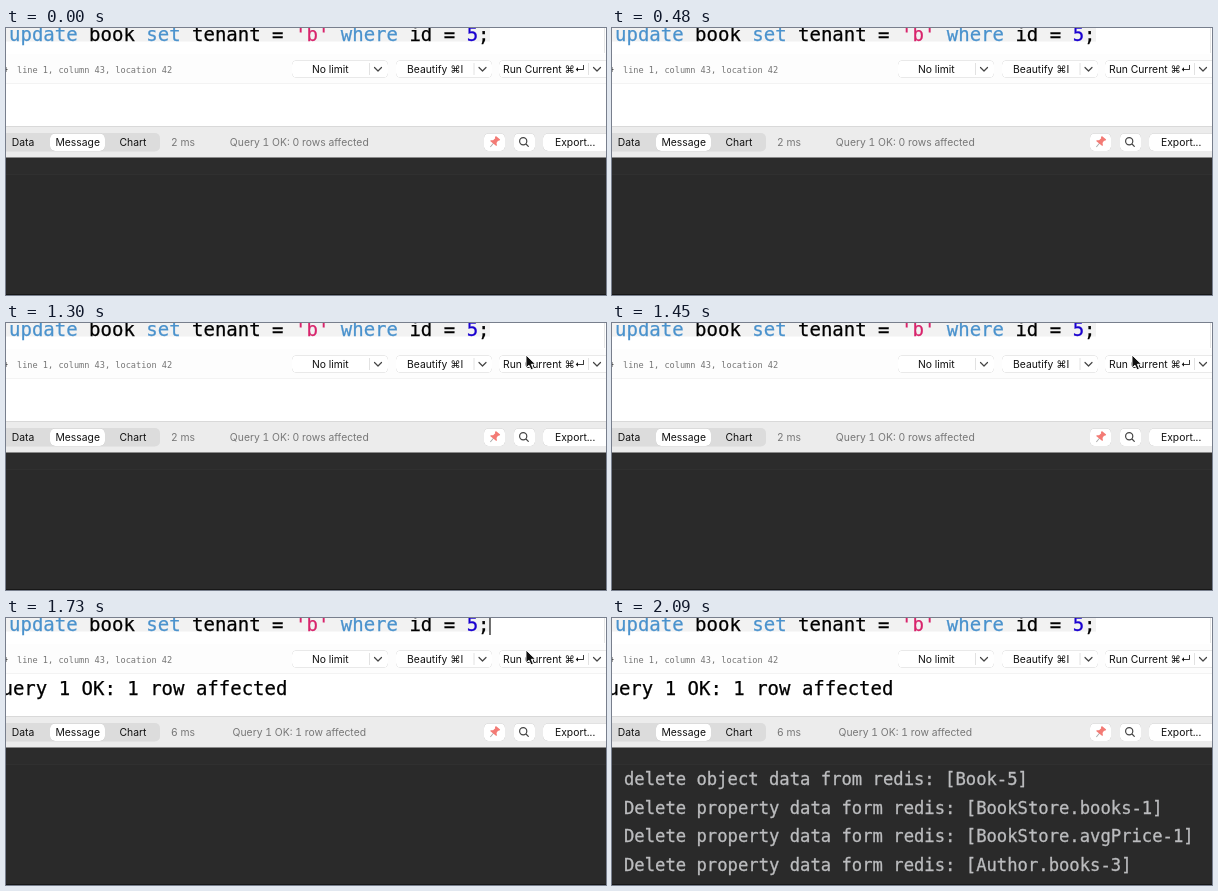
These frames come from a looping animation (600x267 px, 5.33 s). An HTML page:

```html
<!DOCTYPE html>
<html lang="en">
<head>
<meta charset="utf-8">
<title>Query run</title>
<style>
  html, body { margin: 0; width: 100%; height: 100%; overflow: hidden; background: #fff; }
  svg { display: block; width: 100vw; height: 100vh; }
  text { font: 10.35px Inter, "DejaVu Sans", sans-serif; font-variant-numeric: tabular-nums; fill: #111; }
  .code { font: 19px "DejaVu Sans Mono", monospace; fill: #000; stroke: #000; stroke-width: .25; }
  .status { font: 8.6px "DejaVu Sans Mono", monospace; fill: #757575; }
  .log { font: 17.22px "DejaVu Sans Mono", monospace; fill: #bcbdbf; stroke: #bcbdbf; stroke-width: .3; }
  .muted { fill: #777; }
  .mid { text-anchor: middle; }
  .keyword { fill: #4a92cd; stroke: #4a92cd; }
  .string { fill: #d8246c; stroke: #d8246c; }
  .number { fill: #1a00d0; stroke: #1a00d0; }
  .button { fill: #fff; filter: drop-shadow(0 .5px .6px #0005); }
  .line { fill: none; stroke: #444; stroke-width: 1.2; stroke-linecap: round; stroke-linejoin: round; }
</style>
</head>
<body>
<svg viewBox="0 0 600 267" preserveAspectRatio="none">
  <rect width="600" height="267" fill="#fff"/>

  <!-- editor -->
  <rect width="484" height="13.5" fill="#f2f2f2"/>
  <path d="M598.5 0V25" stroke="#e6e6e6"/>
  <text class="code" x="3" y="12.5"><tspan class="keyword">update</tspan> book <tspan class="keyword">set</tspan> tenant = <tspan class="string">'b'</tspan> <tspan class="keyword">where</tspan> id = <tspan class="number">5</tspan>;</text>
  <path id="caret" d="M484 0V17" stroke="#111" stroke-width="1.2"/>
  <rect y="26" width="600" height="30" fill="#fdfdfd"/>
  <path d="M0 55.5H600" stroke="#f3f3f3"/>
  <path d="M0 39V44M0 41.5H1.5" stroke="#555"/>
  <text class="status" x="11" y="45">line 1, column 43, location 42</text>
  <g id="menus"></g>
  <text x="306" y="44.7">No limit</text>
  <text x="401" y="44.7">Beautify ⌘I</text>
  <text id="run" x="497" y="44.7">Run Current ⌘↵</text>
  <text id="cancel" x="513.5" y="44.7">Cancel ⌘.</text>

  <!-- results -->
  <path id="grid" d="M0 80.5H600" stroke="#e4e4e4"/>
  <text id="result" class="code" x="-16" y="77">Query 1 OK: 1 row affected</text>
  <rect y="98" width="600" height="32" fill="#ececec"/>
  <path d="M0 98.5H600" stroke="#d9d9d9"/>
  <rect x="-10" y="105" width="164" height="18.5" rx="5" fill="#dcdcdc"/>
  <rect id="tab" class="button" y="105.5" width="55" height="17.5" rx="5"/>
  <text class="mid" x="17" y="118">Data</text>
  <text class="mid" x="71.7" y="118">Message</text>
  <text class="mid" x="127" y="118">Chart</text>
  <text id="elapsed" class="muted" x="165" y="118"></text>
  <text id="summary" class="muted mid" x="293.3" y="118"></text>
  <rect class="button" x="478" y="105.5" width="21" height="17.5" rx="4.5"/>
  <g transform="translate(488.5 114) rotate(40)">
    <path d="M0 1V6.5" stroke="#aaa"/>
    <path d="M-2.8-5.5H2.8V-4L1.8-3.3 2.2-.5 4 1V2H-4V1L-2.2-.5-1.8-3.3-2.8-4Z" fill="#f37a74"/>
  </g>
  <rect class="button" x="508" y="105.5" width="21" height="17.5" rx="4.5"/>
  <path class="line" d="M520 116L522.3 118.3M520.8 113.2a3.6 3.6 0 1 1-7.2 0a3.6 3.6 0 1 1 7.2 0"/>
  <rect class="button" x="537" y="105.5" width="70" height="17.5" rx="5"/>
  <text x="549" y="118">Export...</text>

  <!-- console -->
  <rect y="129.5" width="600" height="138" fill="#2a2a2a"/>
  <rect y="131" width="600" height="15" fill="#2c2c2c"/>
  <path d="M0 146.5H600" stroke="#303030"/>
  <path d="M0 266.5H600" stroke="#171717"/>
  <g id="logs"></g>

  <path id="pointer" d="M520 32v13l3-2.8 2 4.6 2.3-1-2-4.5h4.2z" fill="#111" stroke="#fff" stroke-width=".9"/>
</svg>
<script>
const LOOP = 5330;
const SHOW_POINTER = 1180, RUN = 1520, DONE = 1610, LOG = 1880, HIDE_POINTER = 1940, HIDE_CARET = 2030;
const $ = id => document.getElementById(id);
const show = (id, on) => $(id).setAttribute('visibility', on ? 'visible' : 'hidden');

const menu = (x, width, split) => `
  <rect class="button" x="${x}" y="32.5" width="${width}" height="17" rx="4.5"/>
  <path d="M${split} 35V47" stroke="#e2e2e2"/>
  <path class="line" d="M${split + 5} 39.5l3.5 3.5 3.5-3.5"/>`;
$('menus').innerHTML = menu(286, 96, 363.5) + menu(390, 96, 468) + menu(493, 112, 582.5);

$('logs').innerHTML = [
  'delete object data from redis: [Book-5]',
  'Delete property data form redis: [BookStore.books-1]',
  'Delete property data form redis: [BookStore.avgPrice-1]',
  'Delete property data form redis: [Author.books-3]'
].map((line, i) => `<text class="log" x="12" y="${167 + i * 28.5}">${line}</text>`).join('');

function draw(now) {
  const t = now % LOOP;
  const running = t >= RUN && t < DONE, done = t >= DONE;
  show('pointer', t >= SHOW_POINTER && t < HIDE_POINTER);
  show('caret', t >= RUN && t < HIDE_CARET);
  show('run', !running);
  show('cancel', running);
  show('grid', running);
  show('result', done);
  show('logs', t >= LOG);
  $('tab').setAttribute('x', running ? -11 : 44);
  $('elapsed').textContent = running ? '' : done ? '6 ms' : '2 ms';
  $('summary').textContent = running ? '' : `Query 1 OK: ${done ? '1 row' : '0 rows'} affected`;
  requestAnimationFrame(draw);
}
draw(0);
</script>
</body>
</html>
```
